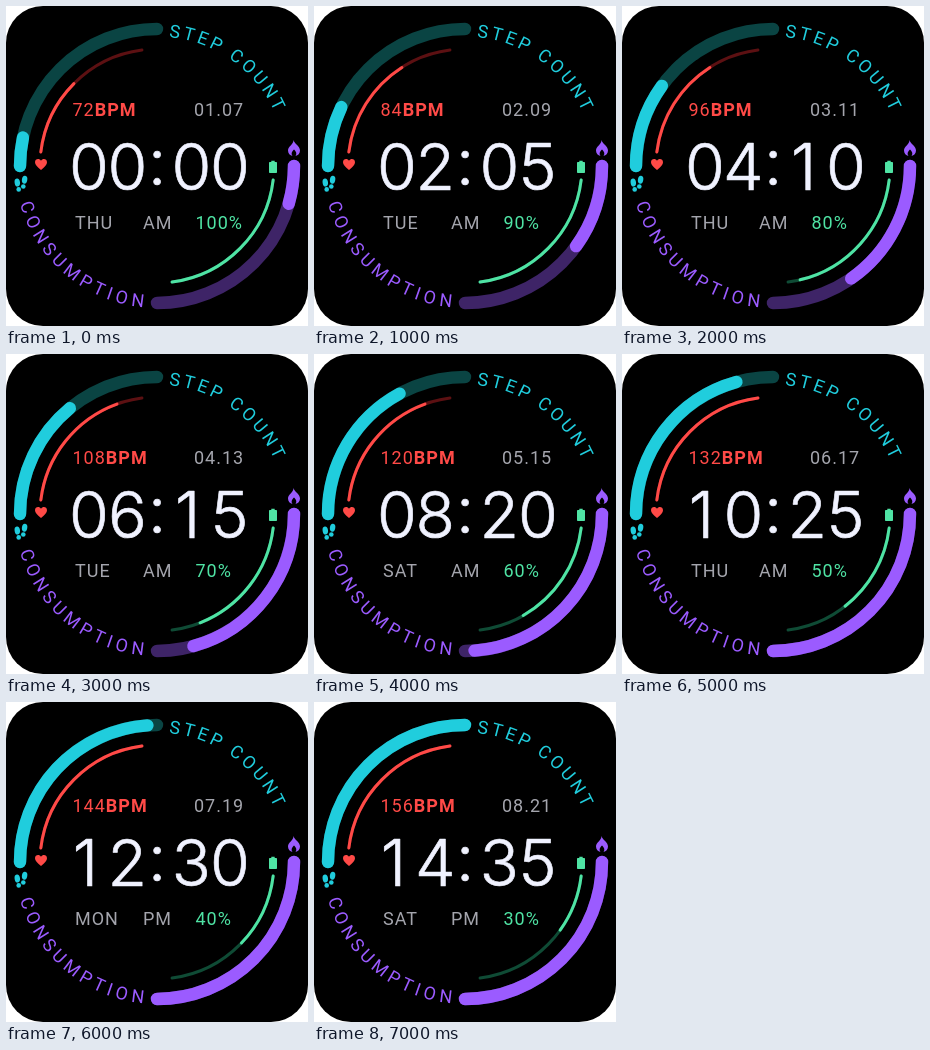
An HTML page for the animation above (8 s loop, 302 by 320 pixels).

```html
<!DOCTYPE html>
<html lang="en">
<head>
<meta charset="utf-8">
<title>Watch face</title>
<style>
html, body { margin: 0; width: 100%; height: 100%; overflow: hidden; background: #fff; }
svg { display: block; width: 100vw; height: 100vh; }
path { fill: none; stroke-linecap: round; }
.icon path { fill: currentColor; stroke: none; }
text { font: 400 18px Roboto, sans-serif; letter-spacing: 1px; fill: #a4a5ad; }
.digit { font: 300 64.5px Inter, sans-serif; letter-spacing: 0; text-anchor: middle;
  fill: #f0f2ff; stroke: #f0f2ff; stroke-width: .7; stroke-linejoin: round; }
</style>
</head>
<body>
<svg viewBox="0 0 302 320">
  <rect width="302" height="320" rx="37"/>
  <g id="rings"></g>

  <path id="top" d="M21.5 160A129.5 129.5 0 0 1 280.5 160"/>
  <path id="bottom" d="M9 160A142 142 0 0 0 293 160"/>
  <text style="fill:#20cddd;letter-spacing:3.2px"><textPath href="#top" startOffset="215">STEP COUNT</textPath></text>
  <text style="fill:#9b5bff;letter-spacing:4.4px"><textPath href="#bottom" startOffset="38">CONSUMPTION</textPath></text>

  <g class="icon">
    <path color="#ff4a47" d="M35 164C31 160.500 29 158.700 29 156.200C29 152.500 33.500 152 35 154.800C36.500 152 41 152.500 41 156.200C41 158.700 39 160.500 35 164Z"/>
    <path color="#4fe3a4" d="M265.300 156V154.800H268.700V156H270.200Q271 156 271 156.800V166.200Q271 167 270.200 167H263.800Q263 167 263 166.200V156.800Q263 156 263.800 156Z"/>
    <path color="#9b5bff" d="M287.500 134C288.500 138 294 140 294 144.500C294 147.500 292 149.500 289.500 150C291.500 147 289.500 145 288 143.500C286.500 145 284.500 147 286.500 150C284 149.500 282 147.500 282 144.500C282 140 287.500 139 287.500 134Z"/>
    <g fill="#20cddd">
      <ellipse cx="11.300" cy="176.500" rx="2.700" ry="4" transform="rotate(-8 11.300 176.500)"/>
      <ellipse cx="12.700" cy="183.400" rx="2.300" ry="2.300"/>
      <ellipse cx="18.600" cy="173.700" rx="2.700" ry="4" transform="rotate(8 18.600 173.700)"/>
      <ellipse cx="17.300" cy="180.500" rx="2.300" ry="2.300"/>
    </g>
  </g>

  <text x="66.500" y="110" style="fill:#ff4a47"><tspan id="bpm"></tspan><tspan font-weight="700">BPM</tspan></text>
  <text id="date" x="188" y="110"></text>
  <g id="clock"></g>
  <text id="day" x="69" y="223"></text>
  <text id="half" x="137" y="223"></text>
  <text id="power" x="189.500" y="223" style="fill:#4fe3a4" font-weight="500"></text>
</svg>
<script>
const $ = id => document.getElementById(id);
const two = n => String(n).padStart(2, "0");

function add(parent, tag, attrs) {
  const el = document.createElementNS("http://www.w3.org/2000/svg", tag);
  for (const key in attrs) el.setAttribute(key, attrs[key]);
  return parent.appendChild(el);
}

// Arc around the dial centre; angles run clockwise from the right.
function arc(r, from, to) {
  const at = deg => {
    const a = deg * Math.PI / 180;
    return (151 + r * Math.cos(a)).toFixed(2) + " " + (160 + r * Math.sin(a)).toFixed(2);
  };
  return `M${at(from)}A${r} ${r} 0 0 1 ${at(to)}`;
}

function ring(r, width, base, from, to, dim, bright) {
  const style = { "stroke-width": width };
  add($("rings"), "path", { ...style, stroke: dim, d: arc(r, base + from, base + to) });
  const bar = add($("rings"), "path", { ...style, stroke: bright });
  return end => bar.setAttribute("d", arc(r, base + from, base + Math.min(to, end)));
}

const LOW = 6.9, HIGH = 82.6;
const setSteps = ring(137, 12.4, 180, 0, 90, "#0a4443", "#20cddd");
const setBurn = ring(137, 12.4, 0, 0, 90, "#3e2467", "#9b5bff");
const setPulse = ring(117, 3, 180, LOW, HIGH, "#5c1012", "#ff4a47");
const setPower = ring(117, 3, 0, LOW, HIGH, "#0f4b35", "#4fe3a4");

const slots = [83, 121.3, 185.3, 224];
const digits = slots.map(() => add($("clock"), "text", { class: "digit", y: 184 }));
add($("clock"), "text", { class: "digit", x: 151, y: 178.5 }).textContent = ":";

const days = ["THU", "TUE", "THU", "TUE", "SAT", "THU", "MON", "SAT"];
const steps = [12, 25.5, 35.8, 50.5, 61.5, 74.5, 86, 90];
const burn = [16, 35.8, 55.2, 74.6, 86, 90, 90, 90];

function show(k) {
  const bpm = 72 + 12 * k, power = 100 - 10 * k, hour = 2 * k;
  setSteps(steps[k]);
  setBurn(burn[k]);
  setPulse(LOW + (HIGH - LOW) * Math.min(1, Math.round(bpm / 24) / 6));
  setPower(11 + 0.82 * power);
  $("bpm").textContent = bpm;
  $("date").textContent = two(k + 1) + "." + two(7 + 2 * k);
  $("day").textContent = days[k];
  $("half").textContent = hour < 12 ? "AM" : "PM";
  $("power").textContent = power + "%";
  [...two(hour) + two(5 * k)].forEach((ch, i) => {
    digits[i].textContent = ch;
    digits[i].setAttribute("x", slots[i] - (ch === "1" ? 3.5 : 0));
  });
}

const start = performance.now();
let shown = -1;
function tick() {
  const k = Math.floor((performance.now() - start) % 8000 / 1000);
  if (k !== shown) show(shown = k);
  requestAnimationFrame(tick);
}
tick();
</script>
</body>
</html>
```
